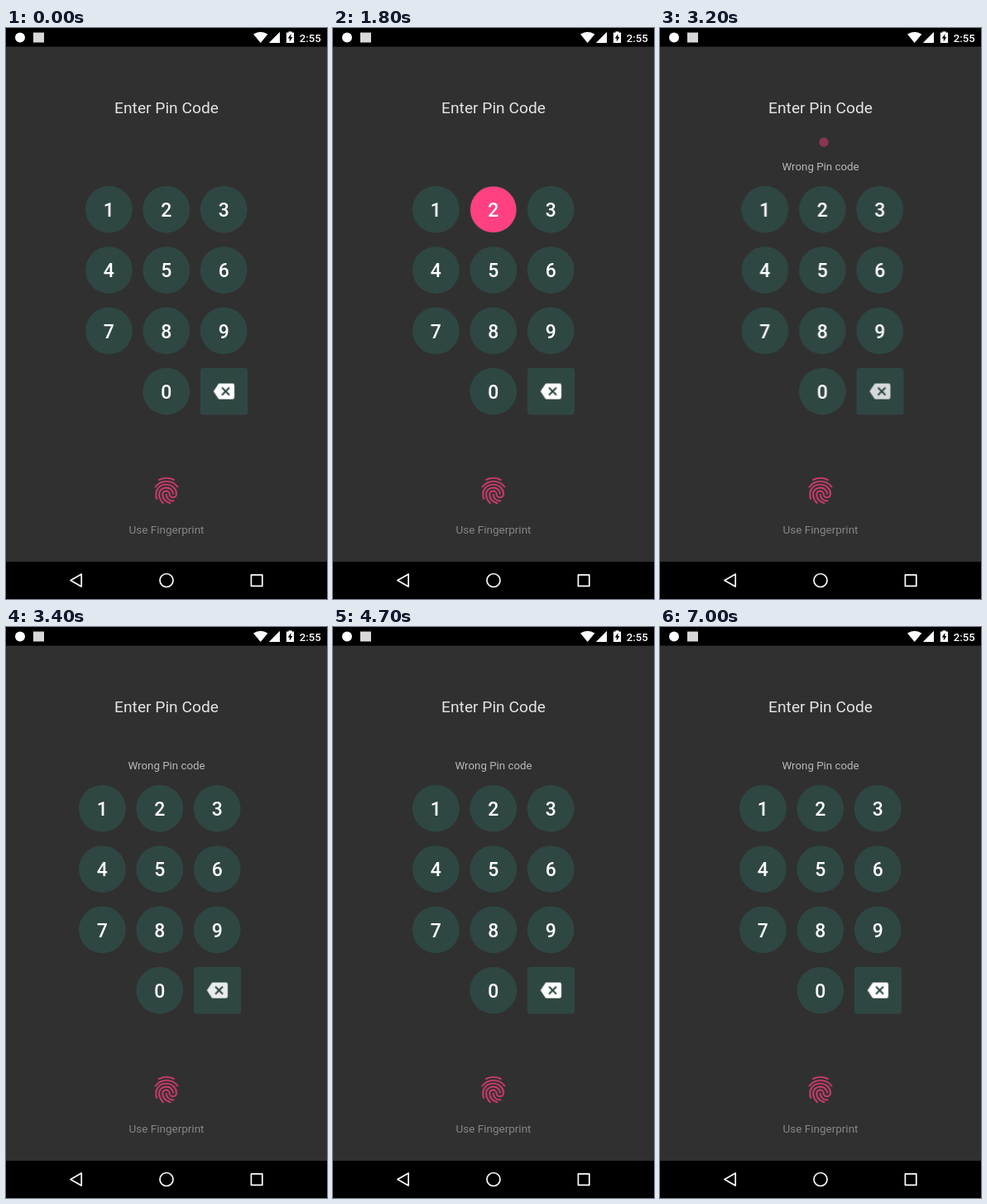
Recreate the animation shown at these times as an HTML page. Size 388 by 690 pixels, loop 8000 ms.

```html
<!DOCTYPE html>
<html lang="en">
<head>
<meta charset="utf-8">
<title>Pin code screen</title>
<style>
  html, body { margin: 0; width: 100%; height: 100%; overflow: hidden; background: #303030; }
  svg { display: block; width: 100vw; height: 100vh; font-family: Roboto, sans-serif; }
  text { text-anchor: middle; }
  .key { fill: #2f4743; }
  .digit { fill: #fff; font-size: 23px; font-weight: 500; }
  .dot, .press { fill: #ff4081; opacity: 0; }

  /* The screen refreshes ten times a second, so every change is a step. */
  .press, .dot, .shake, .row, .error, .icon { animation: 8s step-end infinite; }

  .press { animation-name: press; }
  @keyframes press {
    0% { opacity: .6 }
    1.25% { opacity: 1 }
    3.75% { opacity: .4 }
    5%, 100% { opacity: 0 }
  }

  .row { animation-name: row; }
  @keyframes row {
    0% { transform: translateX(194px) }
    28.75% { transform: translateX(177px) }
    33.75%, 100% { transform: translateX(160px) }
  }
  .first { animation-name: first; }
  .second { animation-name: second; }
  .third { animation-name: third; }
  @keyframes first { 25% { opacity: 1 } 38.75%, 100% { opacity: 0 } }
  @keyframes second { 28.75% { opacity: 1 } 38.75%, 100% { opacity: 0 } }
  @keyframes third { 33.75% { opacity: 1 } 38.75%, 100% { opacity: 0 } }

  .last { animation-name: last; }
  @keyframes last {
    38.75% { opacity: .75; transform: translateX(1px) }
    40% { opacity: .43; transform: translateX(4px) }
    41.25%, 100% { opacity: 0 }
  }

  .error { fill: #b8b8b8; font-size: 13.3px; animation-name: error; }
  @keyframes error { 0% { opacity: 0 } 38.75%, 100% { opacity: 1 } }

  .icon { fill: #fff; animation-name: dim; }
  @keyframes dim {
    38.75% { opacity: .9 }
    40% { opacity: .8 }
    42.5% { opacity: .9 }
    45%, 100% { opacity: 1 }
  }

  .shake { animation-name: shake; }
  @keyframes shake {
    38.75% { transform: translateX(1px) }
    40% { transform: translateX(2.5px) }
    41.25% { transform: translateX(9px) }
    42.5% { transform: translateX(-8px) }
    43.75% { transform: translateX(2px) }
    45% { transform: translateX(5px) }
    46.25% { transform: translateX(-4.7px) }
    47.5% { transform: translateX(1px) }
    48.75%, 100% { transform: none }
  }

  .ridges path {
    fill: none; stroke: #f04079; stroke-width: 1.05; stroke-linecap: round;
    stroke-dasharray: 1 2; animation: trace 8s infinite;
  }
  @keyframes trace {
    0% { stroke-dashoffset: 0; animation-timing-function: step-end }
    75% { stroke-dashoffset: 0; animation-timing-function: steps(5, start) }
    81.25% { stroke-dashoffset: 1.1; animation-timing-function: steps(5, end) }
    87.5%, 100% { stroke-dashoffset: 0 }
  }
</style>
</head>
<body>
<svg viewBox="0 0 388 690">
  <rect width="388" height="690" fill="#303030"/>
  <rect width="388" height="22.6" />
  <rect y="645" width="388" height="45"/>

  <g fill="#fff">
    <circle cx="17" cy="11.5" r="6"/>
    <rect x="33" y="5.5" width="13" height="12" fill="#d8d8d8"/>
    <path d="M307.7 18L299 7.6Q307.7 1.8 316.4 7.6Z"/>
    <path d="M331 4.8V18H317.8Z"/>
    <path d="M341.5 5.5V4.2h4v1.3h2.6V18h-9.2V5.5Z"/>
    <path d="M344.4 7.2v3.7h2l-3.6 5.6v-4h-2Z" fill="#000"/>
    <text x="367.7" y="16.5" font-size="13.2" font-weight="500">2:55</text>
  </g>

  <text x="194" y="103" font-size="19.2" fill="#e4e4e4">Enter Pin Code</text>

  <g class="row">
    <circle class="dot first" cy="138" r="5.7"/>
    <circle class="dot second" cx="34" cy="138" r="5.7"/>
    <circle class="dot third" cx="68" cy="138" r="5.7"/>
  </g>
  <circle class="dot last" cx="194" cy="138" r="5.7"/>
  <text class="error" x="194" y="172">Wrong Pin code</text>

  <g class="shake">
    <g id="keys"></g>
    <rect class="key" x="235" y="410.8" width="57" height="56.6" rx="3.5"/>
    <path class="icon" fill-rule="evenodd" transform="translate(250.8 426.4) scale(1.05)"
      d="M22 3H7Q6 3 5.4 3.9L0 12l5.4 8.1Q6 21 7 21h15q2 0 2-2V5q0-2-2-2ZM19 15.6L17.6 17 14 13.4 10.4 17 9 15.6 12.6 12 9 8.4 10.4 7 14 10.6 17.6 7 19 8.4 15.4 12Z"/>
  </g>

  <g class="ridges" transform="translate(174.8 539.8) scale(1.6)">
    <path pathLength="1" d="M6.3 3.9C8 3 10 2.5 12 2.5s4 .5 5.7 1.4"/>
    <path pathLength="1" d="M3.5 9.3C5.4 6.6 8.5 5 12 5s6.6 1.6 8.5 4.3"/>
    <path pathLength="1" d="M14.8 21.5C11.3 20.5 9.1 18.1 9.1 14.7c0-1.4 1.2-2.45 2.6-2.45s2.6 1.1 2.6 2.45 1.15 2.45 2.6 2.45 2.6-1.1 2.6-2.45C19.5 10.6 16 7.35 11.8 7.35c-3 0-5.8 1.7-7.1 4.3-.9 2-.8 4.3-.1 6.8"/>
    <path pathLength="1" d="M9.4 21.5C7.2 19.2 6.4 17.5 6.4 14.7c0-2.7 2.4-4.9 5.4-4.9s5.2 2.2 5.2 4.9"/>
    <path pathLength="1" d="M17.4 19.7C14 20.1 11.8 17.6 11.8 14.7"/>
  </g>
  <text x="194" y="610.5" font-size="13.5" fill="#858585">Use Fingerprint</text>

  <g fill="none" stroke="#fff" stroke-width="1.7" stroke-linejoin="round">
    <path d="M78 667.5L91.2 660v15Z"/>
    <circle cx="194" cy="667.5" r="8"/>
    <rect x="296.4" y="660.9" width="13.4" height="13.4"/>
  </g>
</svg>
<script>
  const keys = document.getElementById('keys');
  const pressStart = { 2: 1.6, 5: 2, 8: 2.5 };

  function add(tag, attributes, text = '') {
    const node = document.createElementNS(keys.namespaceURI, tag);
    for (const name in attributes) node.setAttribute(name, attributes[name]);
    node.textContent = text;
    keys.append(node);
  }

  for (let digit = 0; digit < 10; digit++) {
    const slot = digit ? digit - 1 : 10;
    const cx = 124.4 + slot % 3 * 69.4;
    const cy = 219.3 + Math.floor(slot / 3) * 73.25;
    add('circle', { class: 'key', cx, cy, r: 28.4 });
    if (digit in pressStart) {
      add('circle', { class: 'press', cx, cy, r: 27.8, style: `animation-delay:${pressStart[digit]}s` });
    }
    add('text', { class: 'digit', x: cx, y: cy + 8.9 }, digit);
  }
</script>
</body>
</html>
```
